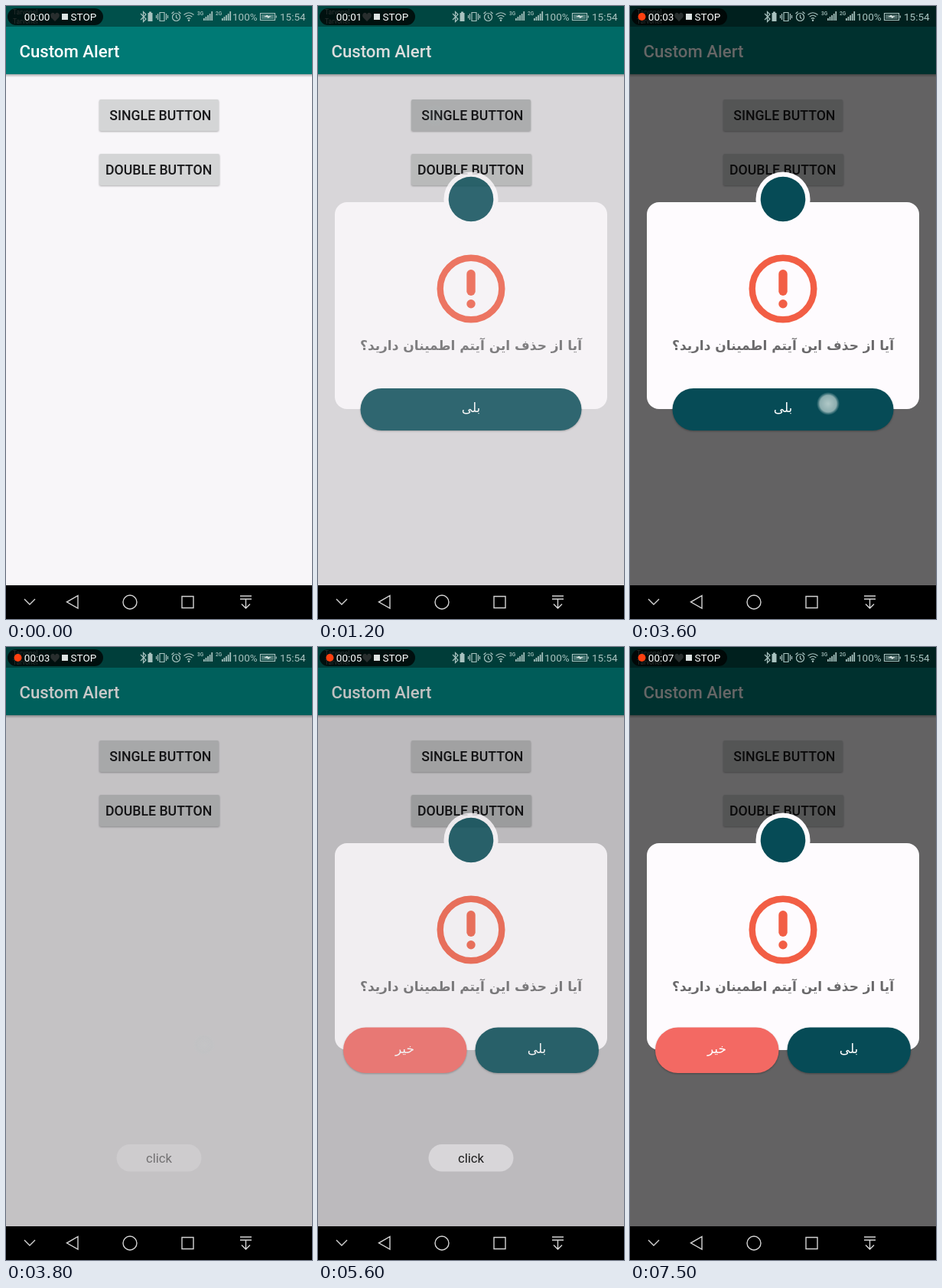
An HTML page that plays this animation: 400 px wide and 800 px high, repeating every 8000 ms.

```html
<!DOCTYPE html>
<html lang="en">
<head>
<meta charset="utf-8">
<title>Custom Alert</title>
<style>
  html, body { margin: 0; width: 100%; height: 100%; overflow: hidden; background: #000; }
  svg { display: block; width: 100%; height: 100%; font-family: Roboto, sans-serif; }
  .line { fill: none; stroke: #d4d4d4; stroke-width: 1.4; }
  .status { font-size: 13.5px; }
  .caps { font-size: 17.7px; font-weight: 500; fill: #18181a; }
  .mid { text-anchor: middle; }
  .fa { font-family: "DejaVu Sans", sans-serif; font-size: 17px; text-anchor: middle; direction: rtl; }
  .button { filter: drop-shadow(0 1px 1px rgba(0, 0, 0, .3)); }
</style>
</head>
<body>
<svg viewBox="0 0 400 800">
  <defs>
    <linearGradient id="shade" x2="0" y2="1">
      <stop stop-color="#000" stop-opacity=".3"/>
      <stop offset="1" stop-color="#000" stop-opacity="0"/>
    </linearGradient>
    <radialGradient id="glow">
      <stop stop-color="#c3d6d4" stop-opacity=".9"/>
      <stop offset=".72" stop-color="#a5bfbf" stop-opacity=".85"/>
      <stop offset=".84" stop-color="#b4cbca" stop-opacity=".4"/>
      <stop offset="1" stop-color="#b4cbca" stop-opacity="0"/>
    </radialGradient>
    <path id="bars" d="M0 19v-3h1.7v3zM2.6 19v-5h1.7v5zM5.2 19v-7h1.7v7zM7.8 19v-9h1.7v9zM10.4 19v-12h1.7v12z"/>
  </defs>

  <!-- app screen -->
  <path fill="#f8f6f9" d="M0 0h400v756H0z"/>
  <path fill="url(#shade)" d="M0 89h400v4H0z"/>
  <path fill="#007a75" d="M0 27h400v62H0z"/>
  <path fill="#00504b" d="M0 0h400v27H0z"/>
  <text x="17.5" y="66.5" font-size="22.2" font-weight="500" fill="#fff">Custom Alert</text>
  <rect class="button" x="122" y="122" width="156" height="41" rx="2" fill="#d4d5d6"/>
  <rect id="press1" x="122" y="122" width="156" height="41" rx="2"/>
  <text class="caps" x="135.3" y="149">SINGLE BUTTON</text>
  <rect class="button" x="122" y="193" width="157" height="41" rx="2" fill="#d4d5d6"/>
  <rect id="press2" x="122" y="193" width="157" height="41" rx="2"/>
  <text class="caps" x="130" y="220">DOUBLE BUTTON</text>

  <path id="dim" d="M0 0h400v756H0z"/>

  <g id="dialog">
    <rect x="22" y="256" width="356" height="270" rx="16" fill="#fefbfe"/>
    <circle cx="200" cy="252" r="35.5" fill="#fefbfe"/>
    <circle cx="200" cy="252" r="29.3" fill="#064b56"/>
    <g fill="#f25e45">
      <circle cx="200" cy="369" r="40.3" fill="none" stroke="#f25e45" stroke-width="8.4"/>
      <rect x="194.3" y="344" width="11.4" height="34" rx="5.7"/>
      <circle cx="200" cy="388.7" r="5.7"/>
    </g>
    <text class="fa" x="200" y="449" font-weight="700" fill="#6a696b">آیا از حذف این آیتم اطمینان دارید؟</text>
    <g id="single" fill="#fff">
      <rect class="button" x="55.5" y="499" width="289" height="55" rx="27.5" fill="#064b56"/>
      <text class="fa" x="200" y="530">بلی</text>
    </g>
    <g id="double" fill="#fff">
      <rect class="button" x="33" y="496.5" width="161.5" height="59.5" rx="29.7" fill="#f36963"/>
      <rect class="button" x="205.5" y="496.5" width="161.5" height="59.5" rx="29.7" fill="#064b56"/>
      <text class="fa" x="113.5" y="530">خیر</text>
      <text class="fa" x="286" y="530">بلی</text>
    </g>
  </g>

  <g id="toast">
    <rect x="144.5" y="649" width="111" height="35.5" rx="17.7" fill="#dad8db"/>
    <text class="mid" x="200" y="673" font-size="16.7" fill="#111">click</text>
  </g>

  <circle id="touch" r="15" fill="url(#glow)"/>

  <!-- status bar -->
  <g fill="#a9c2bf">
    <g font-size="8.5">
      <text x="9" y="11">Tarvonel</text>
      <text x="9" y="23">Tarvonel</text>
    </g>
    <path d="M64 20l-5-5q-2-4 1-6q3-1 4 2q1-3 4-2q3 2 1 6z"/>
    <g fill="none" stroke="#a9c2bf" stroke-width="1.2">
      <path d="M176 10l7 7-3.5 3.5v-13l3.5 3.5-7 7"/>
      <path d="M201 8.5h6v11h-6zM198.5 10v8M209.500 10v8M196.500 12v4M211.500 12v4"/>
      <circle cx="222.500" cy="14.500" r="5"/>
      <path d="M222.500 11.500v3.500l2 1.500M216.500 10l3-2.500M228.500 10l-3-2.500"/>
      <path d="M232.500 11.500q6.500-5.500 13 0M234.700 14q4.300-3.500 8.600 0M236.800 16.500q2.200-1.800 4.400 0"/>
      <path d="M332.500 9.500h19v9h-19zM353.300 12.500v3"/>
    </g>
    <path d="M185.500 9h1.500V7.500h3V9h1.500v11h-6z"/>
    <circle cx="239" cy="18.700" r="1.200"/>
    <path opacity=".45" d="M334 11h16v6h-16z"/>
    <path fill="#e4eeec" d="M337 14l5-2.300v1.600h5l-5 2.800v-1.700z"/>
    <g font-size="6.500" font-weight="500">
      <text x="250" y="12">3G</text>
      <text x="274" y="12">2G</text>
    </g>
    <use href="#bars" x="258"/>
    <use href="#bars" x="282"/>
    <text class="status" x="296" y="18.700">100%</text>
    <text class="status" x="358" y="18.700">15:54</text>
  </g>

  <!-- recorder pill -->
  <rect x="2" y="3" width="125" height="22" rx="11" fill-opacity=".76"/>
  <circle id="rec" cx="15.500" cy="14" r="5" fill="#ff4010"/>
  <g class="status" fill="#fff">
    <text id="clock" x="23.800" y="18.700"></text>
    <path d="M73 10h8v8h-8z" fill="#dde3e2"/>
    <text x="84.500" y="18.700">STOP</text>
  </g>

  <!-- navigation bar -->
  <path d="M0 756h400v44H0z"/>
  <path class="line" d="M24 774l7 7 7-7M94 769.500v16.500l-14.500-8.200zM230 770.500h15v15h-15zM306 770h15M306 774h15M313.500 774v12M308 780.500l5.500 5.500 5.500-5.500"/>
  <circle class="line" cx="162" cy="778" r="9"/>
</svg>
<script>
const LOOP = 8000, STEP = 100;
const el = id => document.getElementById(id);
const fade = (id, value) => el(id).setAttribute('opacity', value);
const ramp = (t, from, to) => Math.min(1, Math.max(0, (t - from) / (to - from)));
const smooth = (t, from, to) => { const x = ramp(t, from, to); return x * x * (3 - 2 * x); };
const pulse = (t, a, b, c, d) => ramp(t, a, b) * (1 - ramp(t, c, d));

const taps = [
  { x: 153, y: 143, start: 750, end: 1050 },
  { x: 259, y: 519, start: 3250, end: 3650 },
  { x: 226, y: 214, start: 5150, end: 5400 }
];

function draw(t) {
  const second = t >= 4500;
  fade('dim', .6 * (second ? smooth(t, 5350, 5920)
    : smooth(t, 1030, 1600) * (1 - smooth(t, 3650, 3900))));
  fade('dialog', second ? ramp(t, 5430, 5640)
    : pulse(t, 1040, 1240, 3650, 3780));
  fade('single', second ? 0 : 1);
  fade('double', second ? 1 : 0);
  fade('toast', pulse(t, 3700, 3920, 5580, 5880));
  fade('press1', .08 * pulse(t, 800, 1000, 1150, 1500));
  fade('press2', .08 * pulse(t, 5200, 5400, 5450, 5700));

  const tap = taps.find(p => t < p.end + 200) || taps[2];
  el('touch').setAttribute('transform', `translate(${tap.x} ${tap.y})`);
  fade('touch', pulse(t, tap.start, tap.start + 100, tap.end, tap.end + 165));

  fade('rec', t % 1000 >= 500 ? 1 : 0);
  el('clock').textContent = '00:0' + Math.floor(t / 1000);
}

const begin = performance.now();
function tick() {
  const t = (performance.now() - begin) % LOOP;
  draw(Math.floor(t / STEP) * STEP);
  requestAnimationFrame(tick);
}
tick();
</script>
</body>
</html>
```
